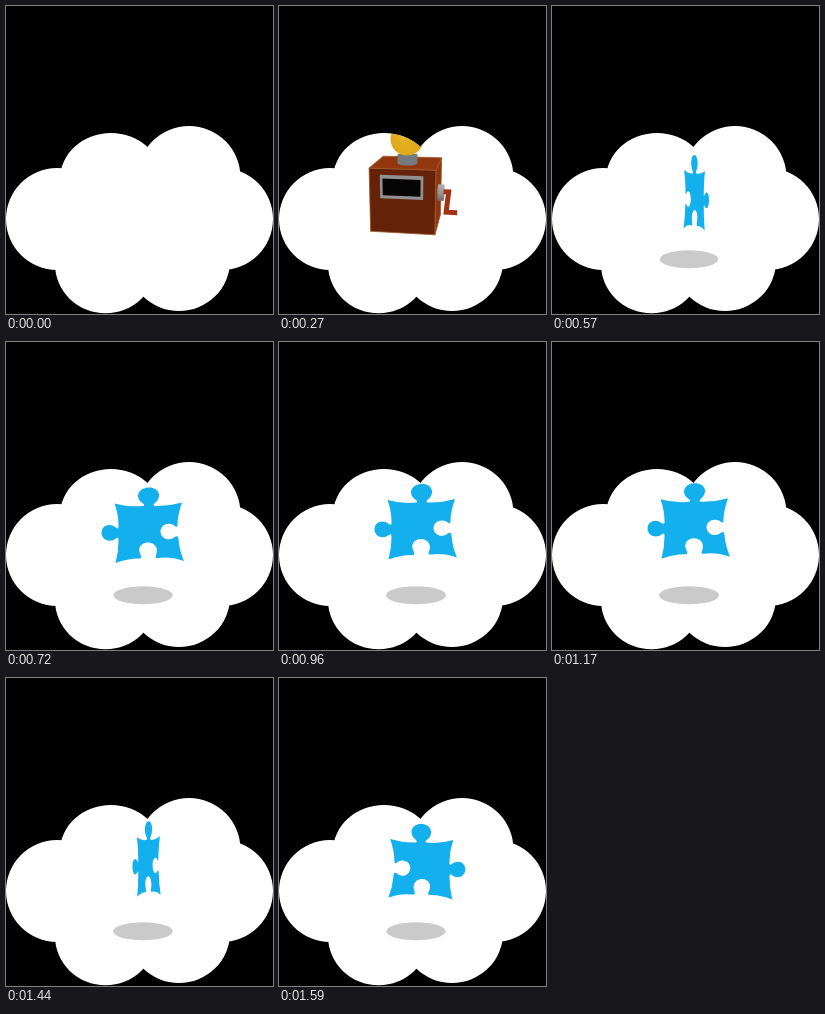
Animation, 267 px wide and 308 px high, one loop 1620 ms. Source, as an HTML page with a canvas:

```html
<!DOCTYPE html>
<html>
<head>
<meta charset="utf-8">
<style>
html, body { margin: 0; height: 100%; overflow: hidden; background: #000; }
canvas { display: block; }
</style>
</head>
<body>
<canvas id="stage" width="267" height="308"></canvas>
<script>
const ctx = document.getElementById('stage').getContext('2d');
const LOOP = 1620, TAU = Math.PI * 2, RAD = Math.PI / 180;
const HALF = 31, PITCH = 0.265, CAMERA = 430;

const cloud = new Path2D();
for (const [x, y, rx, ry] of [
  [51, 213, 51, 51], [105, 173, 51, 46], [183, 171.5, 51.5, 51.5], [216, 213, 51, 51],
  [99.5, 258.3, 50.5, 49], [173, 255, 51, 50], [137, 215, 60, 60]
]) {
  cloud.moveTo(x + rx, y);
  cloud.ellipse(x, y, rx, ry, 0, 0, TAU);
}

// Centred horizontally on its spin axis
const puzzle = new Path2D(`M-34 158 Q-20 162 -5 160.5 C-3 159 -6 158 -8 156
  C-14 149 -8 142 .5 142 C9 142 14 149 8 156 C6 158 4 159 6 160.5
  Q20 161 33.5 157 Q29 170 29 179 C29 183 27 181 25 179.5
  C19 176.5 12 180 12 186 C12 192 19 196 25 192.5 C27 191 30 189 30 194
  Q31 205 35.5 215.5 Q22 211 10 212.5 C6 213 7 211 8 208
  C10 201 5 197 -.5 197 C-7 197 -11 202 -8.5 208 C-7 211 -6 213 -10 213
  Q-21 213 -33 217.5 Q-30 206 -30 195 C-30 190 -32 193 -35 194.5
  C-41 197 -47 193 -47 187.5 C-47 181 -41 178 -35 180.5
  C-32 182 -30 185 -30 180 Q-30 169 -34 158Z`);

// Face coordinates: u across, v up, w outwards
function project(angle, [u, v, w]) {
  const s = Math.sin(angle), c = Math.cos(angle);
  const x = u * c + w * s, z = w * c - u * s;
  const scale = CAMERA / (CAMERA - z * Math.cos(PITCH) - v * Math.sin(PITCH));
  return [x * scale, (z * Math.sin(PITCH) - v * Math.cos(PITCH)) * scale];
}

function trace(angle, points) {
  ctx.beginPath();
  for (const p of points) ctx.lineTo(...project(angle, p));
}

function fill(angle, points, color, edge) {
  trace(angle, points);
  ctx.closePath();
  ctx.fillStyle = color;
  ctx.fill();
  if (edge) {
    ctx.strokeStyle = edge;
    ctx.lineWidth = 0.8;
    ctx.stroke();
  }
}

const rect = (l, b, r, t, w = HALF) => [[l, b, w], [r, b, w], [r, t, w], [l, t, w]];
const ring = (radius, w, v) => Array.from({ length: 32 }, (_, i) =>
  [radius * Math.cos(i * TAU / 32), v + radius * Math.sin(i * TAU / 32), w]);

// Stacked discs, shaded from top to bottom
function tube(angle, radius, length, facing, v) {
  const y = project(angle, [0, v, HALF])[1];
  const shade = ctx.createLinearGradient(0, y - radius, 0, y + radius);
  shade.addColorStop(0, '#adadad');
  shade.addColorStop(0.5, '#989898');
  shade.addColorStop(1, '#6c6c6c');
  for (let i = 0; i <= length; i++) {
    fill(angle, ring(radius, HALF + (facing ? i : length - i), v), shade, shade);
  }
}

function lens(angle, facing) {
  tube(angle, 19.5, 23, facing, 4);
  if (!facing) return;
  fill(angle, ring(19.5, HALF + 23, 4), '#8b8b8b');
  fill(angle, ring(16.5, HALF + 23, 4), '#080808');
}

function crank(angle, facing) {
  const hub = () => tube(angle, 8, 5, facing, 2);
  if (facing) hub();
  trace(angle, [[0, 3, 36], [0, 3, 41], [0, -18, 39], [0, -18, 50]]);
  ctx.strokeStyle = '#a33212';
  ctx.lineWidth = 5;
  ctx.stroke();
  if (!facing) hub();
}

function viewer(angle, facing) {
  if (!facing) return;
  fill(angle, rect(-21, 2.5, 19.5, 25), '#929090');
  fill(angle, rect(-18.5, 5.5, 17, 21.5), '#050505');
}

function machine(t) {
  const left = Math.max(0, 1 - (t - 150) / 270);
  const turn = (-9 + 0.9 * (t - 270)) * RAD;
  const sides = [viewer, crank, lens, null].map((part, i) => {
    const angle = turn + i * TAU / 4;
    return { part, angle, facing: Math.cos(angle) * CAMERA * Math.cos(PITCH) > HALF };
  });
  ctx.save();
  ctx.translate(128.5, 226 - 126 * left * left);
  for (const s of sides) if (!s.facing && s.part) s.part(s.angle, false);
  for (const s of sides) if (s.facing) {
    const light = 19.5 + 12 * Math.abs(Math.sin(s.angle));
    fill(s.angle, rect(-HALF, -HALF, HALF, HALF), `hsl(17 84% ${light}%)`, '#9a5a2c');
    if (s.part === lens) fill(s.angle, rect(-20, -30, 29, -26.5), '#160702');
  }
  const top = [[-HALF, HALF, -HALF], [HALF, HALF, -HALF], [HALF, HALF, HALF], [-HALF, HALF, HALF]];
  fill(turn, top, '#93370f', '#9a5a2c');
  for (const s of sides) if (s.facing && s.part) s.part(s.angle, true);
  bulb();
  ctx.restore();
}

function bulb() {
  ctx.fillStyle = '#747a80';
  ctx.beginPath();
  ctx.ellipse(0, -30, 10, 2.5, 0, 0, Math.PI);
  ctx.lineTo(-10, -39);
  ctx.lineTo(10, -39);
  ctx.fill();
  const glow = ctx.createRadialGradient(-5, -60, 1, 0, -54, 17);
  glow.addColorStop(0, '#e9b936');
  glow.addColorStop(0.4, '#e3ae1d');
  glow.addColorStop(1, '#e0a91a');
  ctx.fillStyle = glow;
  ctx.beginPath();
  ctx.arc(-0.5, -54, 16.5, 0, TAU);
  ctx.fill();
}

function piece(t) {
  const lift = 4.2 * ((t - 1140) / 420) ** 2;
  let turn = 0;
  if (t < 690) turn = 0.9 * (t - 690);
  if (t > 1320) turn = 201 * ((t - 1320) / 270) ** 1.3;
  ctx.fillStyle = '#cacaca';
  ctx.beginPath();
  ctx.ellipse(137, 253.3, 30 - lift * 0.1, 9, 0, 0, TAU);
  ctx.fill();
  ctx.save();
  ctx.translate(142.5, lift - 0.8);
  ctx.scale(Math.cos(turn * RAD), 1);
  ctx.fillStyle = '#14b0ee';
  ctx.fill(puzzle);
  ctx.restore();
}

function draw(now) {
  const t = Math.floor(now % LOOP / 30) * 30;
  ctx.fillStyle = '#000';
  ctx.fillRect(0, 0, 267, 308);
  ctx.save();
  ctx.clip(cloud);
  ctx.fillStyle = '#fff';
  ctx.fillRect(0, 0, 267, 308);
  if (t >= 540) piece(t);
  else if (t >= 150) machine(t);
  ctx.restore();
  requestAnimationFrame(() => draw(performance.now() - start));
}

const start = performance.now();
draw(0);
</script>
</body>
</html>
```
